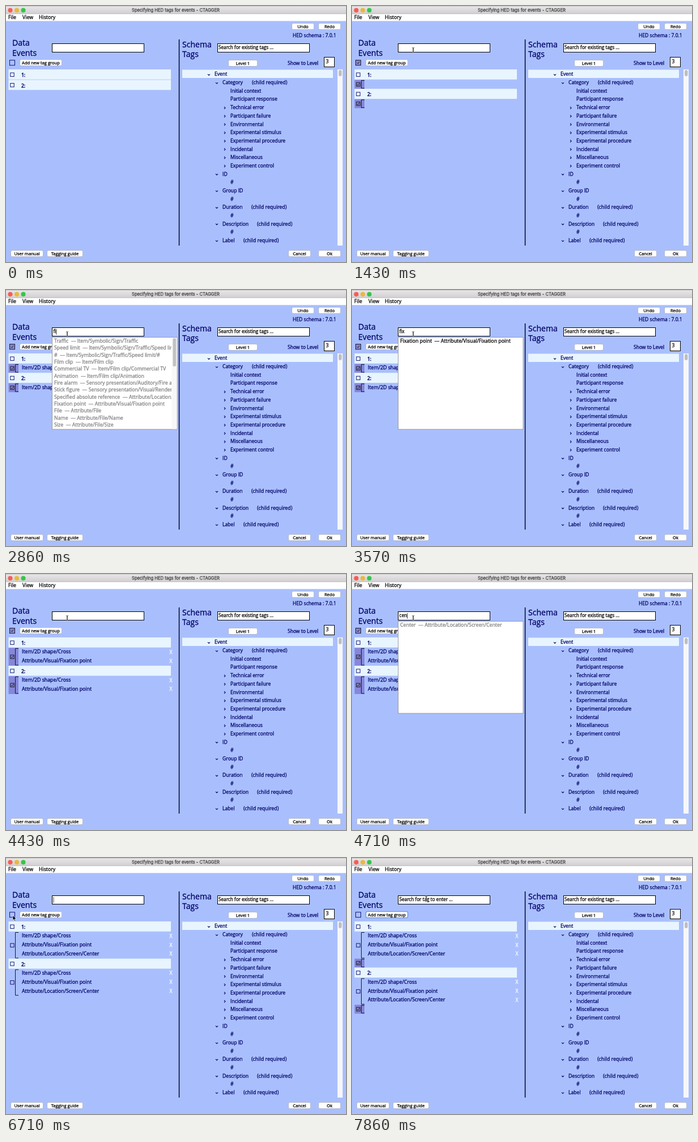
An HTML page that plays this animation: 600 by 452 pixels, repeating every 8000 ms.

```html
<!DOCTYPE html>
<html lang="en">
<head>
<meta charset="utf-8">
<title>Tagging events</title>
<style>
html, body { margin: 0; width: 100%; height: 100%; overflow: hidden; background: #a9bffd; }
svg { display: block; width: 100%; height: 100%; }
text { font-family: "Open Sans", "Noto Sans", sans-serif; white-space: pre; stroke-width: .28; }
</style>
</head>
<body>
<svg viewBox="0 0 600 452">
  <defs>
    <linearGradient id="bar" x2="0" y2="1"><stop stop-color="#e9e7e9"/><stop offset="1" stop-color="#d0ced0"/></linearGradient>
    <clipPath id="listClip"><rect x="81" y="83" width="211" height="163"/></clipPath>
  </defs>
  <g id="window"></g>
  <g id="live"></g>
</svg>
<script>
const NAVY = '#000066', PURPLE = '#8686da', PALE = '#e8f5ff';
const LOOP = 8000, STEPS_PER_MS = 0.007;

const rect = (x, y, w, h, fill, attrs = '') =>
  `<rect x="${x}" y="${y}" width="${w}" height="${h}" fill="${fill}" ${attrs}/>`;
const path = (d, color = '#000', width = 1) =>
  `<path d="${d}" fill="none" stroke="${color}" stroke-width="${width}"/>`;
// y is the middle of the capitals; the thin stroke gives a medium weight
const text = (x, y, s, size = 8.75, fill = NAVY, attrs = '') =>
  `<text x="${x}" y="${y + size * 0.357}" font-size="${size}" fill="${fill}" stroke="${fill}" ${attrs}>${s}</text>`;
const button = (x, y, w, label, focused) =>
  rect(x + .5, y + .5, w - 1, 11, '#fff', `rx="2.5" stroke="${focused ? '#6f9df0' : '#a5a9b5'}" stroke-width="${focused ? 1.6 : .7}"`) +
  text(x + w / 2, y + 5.8, label, 7.6, '#000', 'text-anchor="middle"');
const field = (x, y, w, h) => rect(x + .5, y + .5, w, h, '#fff', 'stroke="#000"');
const checkbox = (cx, cy, checked, size = 6.4) =>
  rect(cx - size / 2, cy - size / 2, size, size, 'none', `stroke="${checked ? '#111' : NAVY}" stroke-width=".9"`) +
  (checked ? path(`M${cx - 2} ${cy}l1.4 1.8l2.8 -3.8`, '#111', .9) : '');

const tree = [
  [0, 'Event', 1], [1, 'Category', 1, 1], [2, 'Initial context'], [2, 'Participant response'],
  ...['Technical error', 'Participant failure', 'Environmental', 'Experimental stimulus',
    'Experimental procedure', 'Incidental', 'Miscellaneous', 'Experiment control'].map(s => [2, s, 2]),
  [1, 'ID', 1], [2, '#'], [1, 'Group ID', 1], [2, '#'], [1, 'Duration', 1, 1], [2, '#'],
  [1, 'Description', 1, 1], [2, '#'], [1, 'Label', 1, 1]
];
const requiredX = { Category: 434, Duration: 433, Description: 443, Label: 419 };

function drawTree() {
  return rect(311, 112.5, 266, 14.5, PALE) + tree.map(([depth, label, chevron, required], i) => {
    const x = 368 + depth * 14, y = 120.4 + i * 14.67;
    const mark = chevron === 1 ? `M${x - 12} ${y}l2 2l2 -2` : `M${x - 11} ${y - 1.2}l2 2l-2 2`;
    return text(x, y, label, 8.65) + (chevron ? path(mark, NAVY, 1.1) : '') +
      (required ? text(requiredX[label], y, '(child required)', 8.85) : '');
  }).join('');
}

function drawWindow() {
  const lights = ['#fb5a55', '#e9b93c', '#33c748'].map((c, i) =>
    `<circle cx="${7.5 + i * 11.5}" cy="7.5" r="4" fill="${c}"/>`).join('');
  return rect(0, 0, 600, 452, '#a9bffd') + rect(0, 0, 600, 14, 'url(#bar)') + rect(0, 0, 600, .8, '#c4c0c0') +
    rect(0, 14, 600, 12.5, '#fff') + rect(0, 13.5, 600, .7, '#b5b3b5') + lights +
    text(299.5, 7.6, 'Specifying HED tags for events - CTAGGER', 7.6, '#444', 'text-anchor="middle" style="font-family:Inter,sans-serif"') +
    text(4, 20, 'File', 8.75, '#000') + text(29, 20, 'View', 8.75, '#000') + text(58, 20, 'History', 8.75, '#000') +
    button(504, 30, 40, 'Undo') + button(551, 30, 40, 'Redo') + button(392, 95, 52, 'Level 1') +
    button(8, 431, 58, 'User manual') + button(72, 431, 64, 'Tagging guide') +
    button(498, 431, 40, 'Cancel') + button(551, 431, 40, 'Ok') +
    text(506, 52.3, 'HED schema : 7.0.1', 8.6) + text(497, 100.8, 'Show to Level', 8.5) +
    text(11, 65.3, 'Data', 14.1) + text(11, 82.9, 'Events', 14.1) +
    text(311, 67.5, 'Schema', 14.1) + text(311, 85.2, 'Tags', 14.1) +
    field(81, 66, 162, 15) + field(373, 66, 162, 15) + field(561, 90, 18, 17) +
    text(375, 73.5, 'Search for existing tags ...', 8.2, '#000') + text(564.5, 97.8, '3', 8.5, '#000') +
    rect(304.8, 59, 1.5, 364, '#00003a') +
    rect(585, 112, 9, 311, '#f6f7fa') + rect(587, 113, 5.5, 11, '#bfbfc2', 'rx="2.7"') +
    drawTree();
}

const lists = {
  cross: ['Cross  — Item/2D shape/Cross', 'Cross  — Attribute/Object control/Cross',
    'Cross boundary  — Action/Cross boundary', 'Arrive  — Action/Cross boundary/Arrive',
    'Depart  — Action/Cross boundary/Depart'],
  fi: ['Traffic  — Item/Symbolic/Sign/Traffic', 'Speed limit  — Item/Symbolic/Sign/Traffic/Speed limit',
    '#  — Item/Symbolic/Sign/Traffic/Speed limit/#', 'Film clip  — Item/Film clip',
    'Commercial TV  — Item/Film clip/Commercial TV', 'Animation  — Item/Film clip/Animation',
    'Fire alarm  — Sensory presentation/Auditory/Fire alarm',
    'Stick figure  — Sensory presentation/Visual/Rendering type',
    'Specified absolute reference  — Attribute/Location/Reference',
    'Fixation point  — Attribute/Visual/Fixation point', 'File  — Attribute/File',
    'Name  — Attribute/File/Name', 'Size  — Attribute/File/Size'],
  fix: ['Fixation point  — Attribute/Visual/Fixation point'],
  center: ['Center  — Attribute/Location/Screen/Center']
};

// step, typed text, suggestion list, first suggestion chosen
const typing = [
  [-4, ''], [6, ''], [11, 'c'], [12, 'cro', 'cross'], [13, 'cross', 'cross'], [14, 'cross', 'cross', true],
  [17, ''], [19, 'f'], [20, 'fi', 'fi'], [21, 'fix', 'fix'], [23, 'fix', 'fix', true],
  [26, ''], [32, 'c'], [33, 'cen', 'center'], [34, 'center', 'center'], [35, 'center', 'center', true], [37, '']
];
const tags = ['Item/2D shape/Cross', 'Attribute/Visual/Fixation point', 'Attribute/Location/Screen/Center'];
const tagSteps = [17, 26, 37];
const ADD_GROUP = 3, FOCUS_FIELD = 6, UNCHECK = 44, ADD_SECOND = 51;
const pointerPath = [[1, 88, 128], [3, 62, 101], [4, 66, 100], [6, 108, 78], [41, 108, 78], [43, 12, 101],
  [47, 12, 101], [50, 62, 101], [52, 64, 100], [55, 131, 72]];

function drawGroup(y, names, checked) {
  const h = Math.max(1, names.length) * 15.73;
  return (checked ? rect(4.5, y, 17.5, h, PURPLE) : '') +
    path(`M22 ${y + 1}H16.5V${y + h - 1}H22`, '#15152d') + checkbox(11, y + h / 2, checked) +
    names.map((name, i) => text(28, y + 6.7 + i * 15.8, name, 8.8) +
      text(291, y + 7.2 + i * 15.8, 'X', 8.5, '#fff', 'text-anchor="middle"')).join('');
}

function drawEvents(step) {
  const names = tags.filter((_, i) => step >= tagSteps[i]);
  const groups = [];
  if (step >= ADD_GROUP) groups.push([names, step < UNCHECK]);
  if (step >= ADD_SECOND) groups.push([[], true]);
  let y = 112, out = '';
  for (const id of [1, 2]) {
    out += rect(4.5, y, 286.5, 17.7, PALE) + checkbox(11, y + 9.2, false) +
      text(27, y + 10, id + ':', 8.5, NAVY, 'font-weight="600"');
    y += 18.5;
    for (const [list, checked] of groups) {
      out += drawGroup(y, list, checked);
      y += Math.max(1, list.length) * 15.73;
    }
  }
  return out;
}

function drawList(items, chosen) {
  const scroll = items.length > 12;
  return rect(81.5, 83.5, 220.5, 162.5, '#fff', 'stroke="#8d93a5" stroke-width=".9"') +
    `<g clip-path="url(#listClip)">` + items.map((s, i) =>
      text(85, 90 + i * 12.33, s, 8.8, chosen && i === 0 ? '#000' : '#828282')).join('') + '</g>' +
    (scroll ? rect(292.5, 84, 9, 161.5, '#f7f7f7') + rect(294.5, 85, 5.5, 50, '#c1c1c1', 'rx="2.7"') : '');
}

function drawPointer(step) {
  const next = pointerPath.findIndex(p => p[0] > step);
  if (next === 0) return '';
  const b = pointerPath.at(next), a = next < 0 ? b : pointerPath[next - 1];
  const k = a === b ? 0 : (step - a[0]) / (b[0] - a[0]);
  const x = a[1] + (b[1] - a[1]) * k, y = a[2] + (b[2] - a[2]) * k;
  if (x > 81 && x < 243 && y > 66 && y < 84) {
    const beam = `M${x - 1.8} ${y - 4.5}q1.8 0 1.8 1.4v6.2q0 1.4 -1.8 1.4m3.6 0q-1.8 0 -1.8 -1.4v-6.2q0 -1.4 1.8 -1.4`;
    return path(beam, '#fff', 1.8) + path(beam, '#111', .8);
  }
  return `<path d="M${x} ${y}v9l2 -1.8l1.4 3.2l1.5 -.7l-1.4 -3h2.8z" fill="#000" stroke="#fff" stroke-width=".7"/>`;
}

const live = document.getElementById('live');

function drawLive(step) {
  const [since, typed, list, chosen] = typing.findLast(e => e[0] <= step);
  const buttonFocus = step >= ADD_SECOND || (step >= ADD_GROUP && step < FOCUS_FIELD);
  const allChecked = step >= ADD_GROUP && step < UNCHECK;
  const caretOn = !buttonFocus && !chosen && Math.floor((step - since) / 3.5) % 2 === 0;
  live.innerHTML =
    (allChecked ? rect(6, 95, 10, 10, PURPLE) : '') + checkbox(11, 100.2, allChecked, 9) +
    button(24, 94, 75, 'Add new tag group', buttonFocus) + drawEvents(step) +
    text(83.5, 73.5, buttonFocus ? 'Search for tag to enter ...' : typed, 8.2, '#000', 'id="typed"') +
    (list ? drawList(lists[list], chosen) : '');
  const caretX = 84 + (typed ? document.getElementById('typed').getComputedTextLength() : 0);
  live.innerHTML += (caretOn ? path(`M${caretX} 69V79`, '#111', .8) : '') + drawPointer(step);
}

document.getElementById('window').innerHTML = drawWindow();
let shown = -1;
function tick() {
  // a few ms of lead absorbs the rounding of the step times
  const step = Math.min(55, Math.floor((performance.now() % LOOP + 5) * STEPS_PER_MS));
  if (step !== shown) drawLive(shown = step);
  requestAnimationFrame(tick);
}
tick();
</script>
</body>
</html>
```
